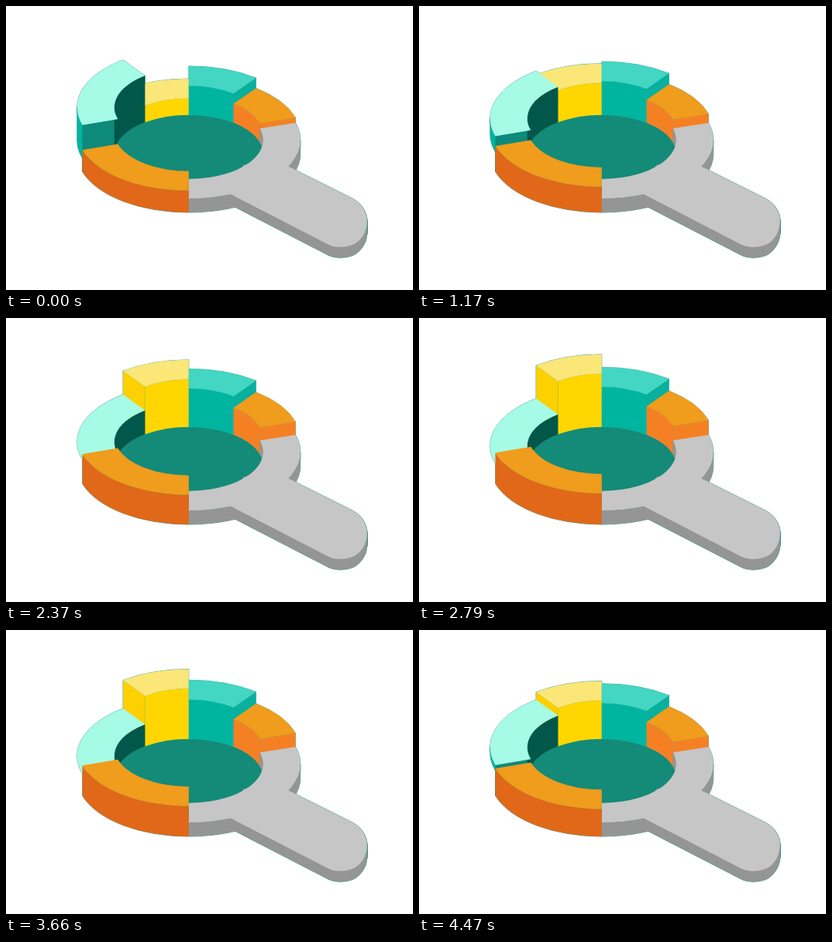
An HTML page with a canvas for the animation above (4.5 s loop, 514 px wide and 359 px high).

```html
<!DOCTYPE html>
<html lang="en">
<head>
<meta charset="utf-8">
<title>Magnifier chart</title>
<style>
html, body { margin: 0; width: 100%; height: 100%; overflow: hidden; background: #fff; }
canvas { display: block; width: 514px; height: 359px; }
</style>
</head>
<body>
<canvas id="stage" width="514" height="359"></canvas>
<script>
const ctx = document.getElementById('stage').getContext('2d');
const LOOP = 4500, STEP = 30, PEAK = 3150, FALL = 2810;
const CX = 230.8, OUTER = 141, INNER = 94, TILT = 0.525;
const BASE = 187, RIM = 169.3, FRINGE = '#2a9484';

// Angles in degrees, counter-clockwise from the right; y is the centre of the top face.
const parts = {
  yellow: { from: 90, to: 126, low: 166, high: 114, top: '#fbe678', inner: '#ffd600', end: '#fdd000', endAt: 126 },
  teal: { from: 53, to: 90, low: 150, high: 134.5, top: '#42d6c3', inner: '#00b5a0', end: '#08b09d', endAt: 53 },
  mint: { from: 126, to: 197.7, low: 128, high: 166, top: '#a5fbe6', inner: '#00574a', outer: '#00b5a0', end: '#0d8a7a', endAt: 197.7 },
  amber: { from: 17, to: 53, low: 163, high: 149.7, top: '#f09c1c', inner: '#f58024', end: '#f58024', endAt: 17 },
  front: { from: 197.7, to: 270, low: 159.5, high: 146.3, top: '#f09c1c', outer: '#e06818' }
};

const handle = new Path2D('M283 237.5L405 300.5C414 306 429 306 440 301C450 295 456 284 456 272C456 260 449 249 437 243L357 203L300 200Z');

const rad = deg => deg * Math.PI / 180;

function arc(path, r, y, from, to) {
  path.ellipse(CX, y, r, r * TILT, 0, -rad(from), -rad(to), to > from);
}

function band(rA, yA, rB, yB, from, to) {
  const path = new Path2D();
  arc(path, rA, yA, from, to);
  arc(path, rB, yB, to, from);
  path.closePath();
  return path;
}

function endFace(deg, y) {
  const path = new Path2D();
  const point = (r, cy) => path.lineTo(CX + r * Math.cos(rad(deg)), cy - r * TILT * Math.sin(rad(deg)));
  point(OUTER, y);
  point(INNER, y);
  point(INNER, BASE);
  point(OUTER, BASE);
  path.closePath();
  return path;
}

function drawPart(part, y, paint, bottom = BASE) {
  const { from, to } = part;
  if (part.outer && bottom > y) {
    paint(band(OUTER, y, OUTER, bottom, Math.max(from, 180), to), part.outer);
  }
  if (part.end) paint(endFace(part.endAt, y), part.end);
  if (part.inner) paint(band(INNER, y, INNER, BASE, from, Math.min(to, 180)), part.inner);
  paint(band(OUTER, y, INNER, y, from, to), part.top);
}

function drawLens(paint) {
  const wall = '#959595', top = '#c6c6c6';
  paint(band(OUTER, RIM, OUTER, BASE, -90, 0), wall);
  paint(band(INNER, RIM, INNER, BASE, 0, 17), wall);
  for (let dy = 13.5; dy > 0; dy -= 0.5) {
    ctx.save();
    ctx.translate(0, dy);
    paint(handle, wall);
    ctx.restore();
  }
  paint(band(OUTER, RIM, INNER, RIM, -90, 17), top);
  ctx.save();
  ctx.beginPath();
  ctx.rect(0, 0, 514, 359);
  ctx.ellipse(CX, RIM, INNER, INNER * TILT, 0, 0, 2 * Math.PI);
  ctx.clip('evenodd');
  paint(handle, top);
  ctx.restore();
}

function drawScene(p, paint) {
  const y = name => parts[name].low + (parts[name].high - parts[name].low) * p;
  const floor = new Path2D();
  arc(floor, INNER, BASE, 0, 360);
  paint(floor, '#138b78');
  drawPart(parts.yellow, y('yellow'), paint);
  drawPart(parts.teal, y('teal'), paint);
  const drop = Math.min(42, 1.6 * (y('front') - y('mint')));
  // The end face is hidden once the front block stands higher.
  const mint = drop > 0 ? parts.mint : { ...parts.mint, end: null };
  drawPart(mint, y('mint'), paint, y('mint') + drop);
  drawPart(parts.amber, y('amber'), paint);
  drawLens(paint);
  drawPart(parts.front, y('front'), paint);
}

function fill(path, color) {
  ctx.fillStyle = color;
  ctx.fill(path);
}

function outline(path) {
  ctx.strokeStyle = FRINGE;
  ctx.lineWidth = 0.8;
  ctx.stroke(path);
}

const start = performance.now();

function frame() {
  const elapsed = (performance.now() - start) % LOOP;
  const t = Math.floor(elapsed / STEP) * STEP;
  const p = t < PEAK ? t / PEAK : 1 - (t - PEAK) / FALL;
  ctx.fillStyle = '#fff';
  ctx.fillRect(0, 0, 514, 359);
  ctx.lineJoin = 'round';
  drawScene(p, outline);
  drawScene(p, fill);
  requestAnimationFrame(frame);
}
frame();
</script>
</body>
</html>
```
